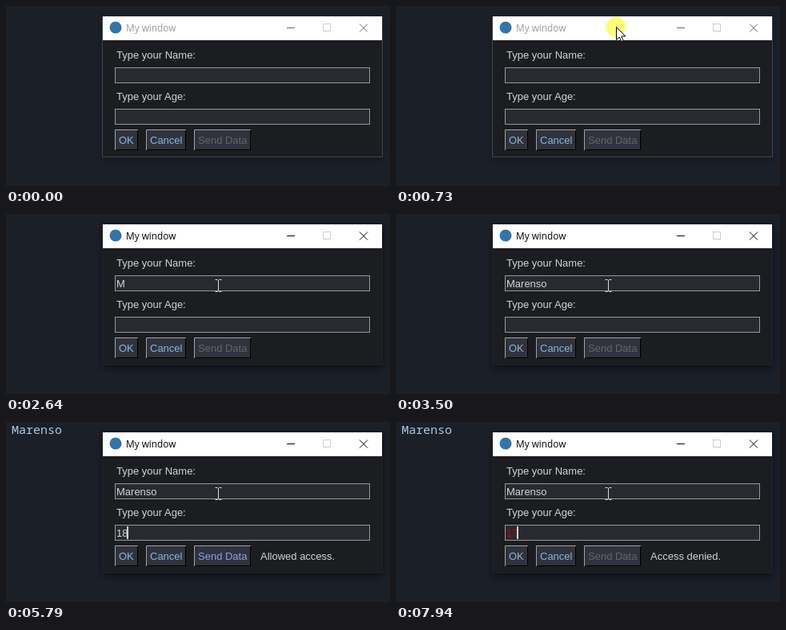
Animation of 480 by 226 pixels, one loop 8000 ms. Source, as an HTML page:

```html
<!DOCTYPE html>
<html lang="en">
<head>
<meta charset="utf-8">
<title>My window</title>
<style>
  html, body { margin: 0; width: 480px; height: 226px; overflow: hidden; background: #1b1f28; }
  svg { display: block; }
  text { font: 13px "Liberation Sans", Arial, sans-serif; white-space: pre; }
  #title { font: 11.8px "Open Sans", "Noto Sans", sans-serif; }
  #output { font: 15px "Noto Sans Mono", "DejaVu Sans Mono", monospace; }
</style>
</head>
<body>
<svg id="stage" width="480" height="226" viewBox="0 0 480 226">
  <defs>
    <filter id="blur" x="-10%" y="-20%" width="120%" height="140%"><feGaussianBlur stdDeviation="4"/></filter>
  </defs>
  <rect width="480" height="226" fill="#1b1f28"/>
  <text id="output" x="7" y="15" fill="#a9cbe6"></text>

  <rect id="shadow" x="121" y="16" width="350" height="177" fill="#000" filter="url(#blur)"/>
  <rect x="121" y="13" width="349" height="177" fill="#1c1d21"/>
  <path id="frame" d="M120.5 13V189.5H470.5V13" fill="none"/>
  <rect x="121" y="13" width="349" height="30" fill="#fff"/>
  <circle cx="137" cy="27" r="7.5" fill="#3572a5"/>
  <text id="title" x="150" y="32">My window</text>
  <g id="controls" fill="none">
    <path d="M351 27.5H361" shape-rendering="crispEdges"/>
    <path d="M442 22.5L452 32.5M452 22.5L442 32.5"/>
  </g>
  <rect x="396.5" y="22.5" width="9" height="9" fill="none" stroke="#ccc"/>

  <g id="form"></g>
  <text id="name" x="138" y="92" fill="#d2d3d6"></text>
  <text id="age" x="138" y="144"></text>
  <rect id="caret" width="2" height="16" fill="#d0d1d4"/>
  <text id="message" x="318" y="173" fill="#d2d3d6"></text>

  <circle id="halo" cx="275" cy="26.5" r="12.5" fill="#fffb78"/>
  <path id="arrow" d="M.5 .5V16.5L4.3 13L6.8 18.6L9.2 17.6L6.8 12H11.8Z" fill="#fff" stroke="#000"/>
  <path id="beam" d="M261.5 82.5H264.5L265.5 83.5L266.5 82.5H269.5M265.5 83V97M261.5 97.5H264.5L265.5 96.5L266.5 97.5H269.5"
        fill="none" stroke="#d8d8d8"/>
</svg>
<script>
const LOOP = 8000;
const NAME = "Marenso";
const $ = id => document.getElementById(id);

const input = y => `
  <rect x="136.5" y="${y + .5}" width="318" height="19" fill="#282a31" stroke="#96979a"/>`;
const label = (text, y) => `<text x="138" y="${y}" fill="#d2d3d6">${text}</text>`;
const button = (id, text, x, width) => `
  <rect x="${x}" y="155" width="${width}" height="26" fill="#30333e"/>
  <path d="M${x + .5} 181V155.5H${x + width}" fill="none" stroke="#a0a1a4"/>
  <path d="M${x + 1} 180.5H${x + width - .5}V156" fill="none" stroke="#000"/>
  <text id="${id}" x="${x + 5}" y="173" fill="#8db5d9">${text}</text>`;

$("form").innerHTML =
  label("Type your Name:", 66) + input(77) +
  label("Type your Age:", 118) + input(129) +
  button("ok", "OK", 136, 29) +
  button("cancel", "Cancel", 175, 50) +
  button("send", "Send Data", 235, 71);

// Moments at which each letter of the name is typed
const KEYS = [2640, 2780, 3020, 3110, 3210, 3310, 3410];
// Moments at which the caret flips, starting hidden
const BLINKS = [1170, 1770, 2060, 2640, 2930, 3500, 3830, 4590, 4880, 5480, 5790, 6370, 6680, 7280, 7570];

// Path of the pointer: time, x, y
const PATH = [[40, 308, -8], [330, 286, 14], [620, 275, 26], [900, 275, 26], [1230, 268, 57], [1430, 265, 90]];

const passed = (times, t) => times.filter(time => t >= time).length;
const mix = (a, b, k) => a + (b - a) * k;
const show = (id, visible) => $(id).setAttribute("visibility", visible ? "visible" : "hidden");
const set = (id, attrs) => {
  for (const key in attrs) $(id).setAttribute(key, attrs[key]);
};

function pointerAt(t) {
  const next = PATH.findIndex(point => t < point[0]);
  if (next < 0) return PATH[PATH.length - 1].slice(1);
  if (next === 0) return PATH[0].slice(1);
  const [t0, x0, y0] = PATH[next - 1];
  const [t1, x1, y1] = PATH[next];
  const k = (t - t0) / (t1 - t0);
  return [Math.round(mix(x0, x1, k)), Math.round(mix(y0, y1, k))];
}

function ageAt(t) {
  if (t < 4720) return "";
  if (t < 4860) return "1";
  if (t < 7180) return "18";
  return t < 7370 ? "1" : "17";
}

function render(t) {
  const active = t >= 830;
  const sent = t >= 5380;
  const denied = t >= 7940;

  set("shadow", { opacity: active ? .5 : .25 });
  set("frame", { stroke: active ? "#202126" : "#44464a" });
  set("title", { fill: active ? "#000" : "#9a9a94" });
  set("controls", { stroke: active ? "#000" : "#6b6b6b" });

  $("name").textContent = NAME.slice(0, passed(KEYS, t));
  $("age").textContent = ageAt(t);
  set("age", { fill: denied ? "#c8000c" : "#cbdcc4" });

  $("output").textContent = sent ? NAME : "";
  $("message").textContent = denied ? "Access denied." : sent ? "Allowed access." : "";
  set("send", { fill: sent && !denied ? "#8f9fe0" : "#63656c" });

  const onAge = t >= 3990;
  const typed = $(onAge ? "age" : "name");
  const width = typed.textContent ? typed.getComputedTextLength() : 0;
  set("caret", { x: 137 + Math.floor(width), y: onAge ? 131 : 79 });
  show("caret", passed(BLINKS, t) % 2 === 1);

  const [x, y] = pointerAt(t);
  const overInput = y >= 77;
  set("arrow", { transform: `translate(${x} ${y})` });
  show("arrow", t >= 40 && !overInput);
  show("beam", overInput);
  set("beam", { transform: `translate(${x - 265} ${y - 90})` });
  show("halo", t >= 690 && t < 900);
}

const start = performance.now();
function tick() {
  render((performance.now() - start) % LOOP);
  requestAnimationFrame(tick);
}
render(0);
requestAnimationFrame(tick);
</script>
</body>
</html>
```
